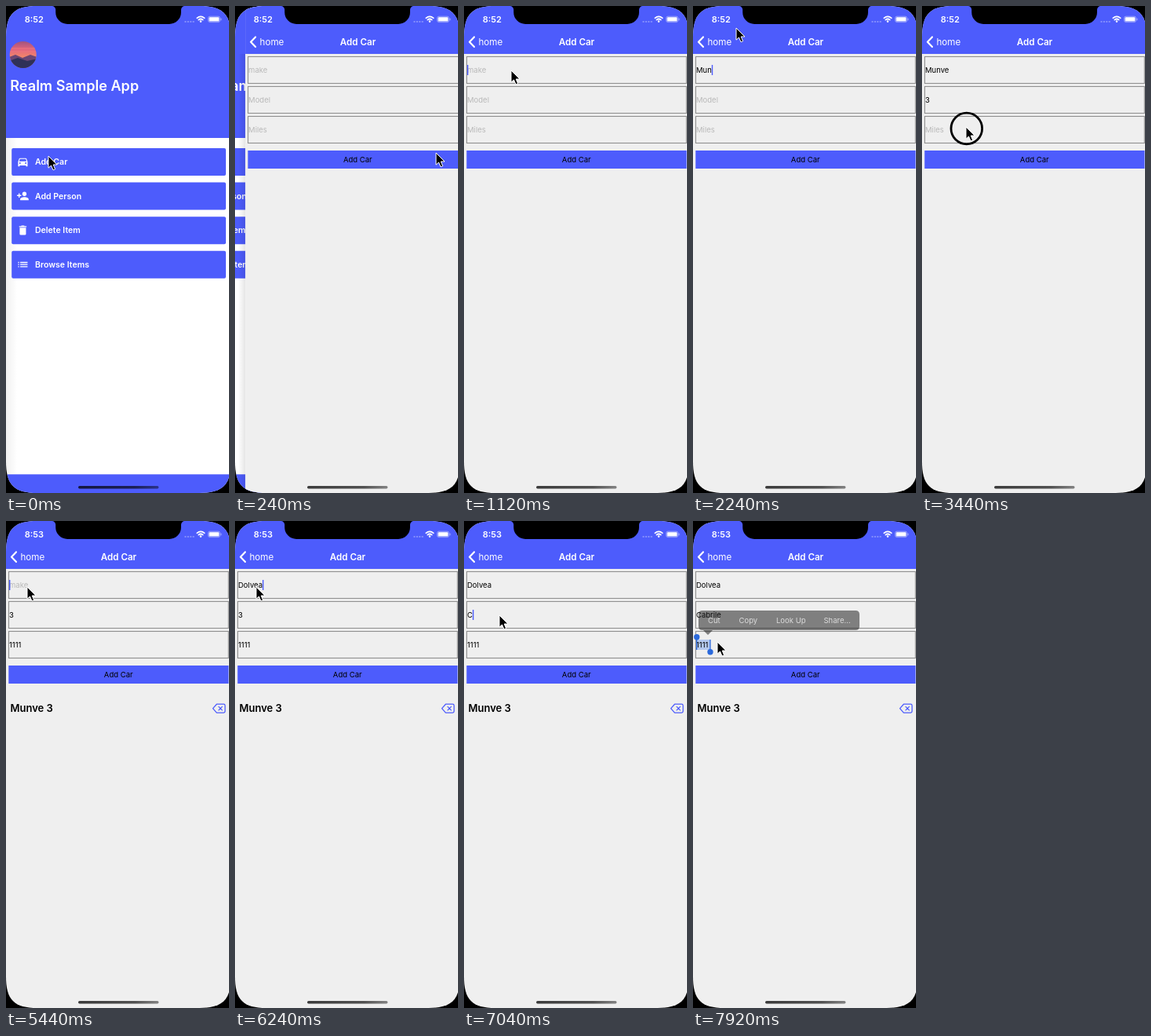
Recreate the animation shown at these times as an HTML page. Size 284 px wide and 620 px high, loop 8000 ms.

```html
<!DOCTYPE html>
<html lang="en">
<head>
<meta charset="utf-8">
<title>Sample app</title>
<style>
  html, body { margin: 0; width: 100%; height: 100%; overflow: hidden; background: #000; }
  svg { display: block; width: 284px; height: 620px; font-family: Inter, sans-serif; font-size: 9.5px; }
  .bold { font-weight: 600; }
  .white { fill: #fff; }
  .blue { fill: #4d5cfc; }
  .line { fill: none; stroke-linecap: round; stroke-linejoin: round; }
</style>
</head>
<body>
<svg viewBox="0 0 284 620">
  <defs>
    <clipPath id="screen">
      <path d="M0 40C0 10.400 10.400 0 40 0H246.500C276 0 286.500 10.400 286.500 40V580C286.500 609.600 276 620 246.500 620H40C10.400 620 0 609.600 0 580Z"/>
    </clipPath>
    <clipPath id="round"><circle cx="21.7" cy="62" r="17"/></clipPath>
    <linearGradient id="sky" x2="0" y2="1">
      <stop offset="0" stop-color="#a0547f"/>
      <stop offset=".3" stop-color="#e2667c"/>
      <stop offset=".6" stop-color="#f58a68"/>
    </linearGradient>
    <linearGradient id="edge">
      <stop offset="0" stop-opacity=".06"/>
      <stop offset="1" stop-opacity="0"/>
    </linearGradient>
    <linearGradient id="shade">
      <stop offset="0" stop-opacity="0"/>
      <stop offset="1" stop-opacity=".1"/>
    </linearGradient>
    <linearGradient id="bar">
      <stop offset="0" stop-opacity=".75"/>
      <stop offset=".7" stop-opacity=".66"/>
      <stop offset="1" stop-opacity=".45"/>
    </linearGradient>
  </defs>

  <g clip-path="url(#screen)">
    <g id="home">
      <rect width="284" height="620" fill="#fff"/>
      <rect y="168" width="14" height="428" fill="url(#edge)"/>
      <path class="blue" d="M0 0H284V168H0ZM0 596.300H284V620H0Z"/>
      <g clip-path="url(#round)">
        <rect x="4" y="45" width="36" height="35" fill="url(#sky)"/>
        <path d="M4 54H40M4 58H40" stroke="#ef7680" stroke-width="1.2"/>
        <path d="M4 65L12 62L21 66L31 62L40 65V80H4Z" fill="#6b4673"/>
        <path d="M4 70L15 66L27 70L40 67V80H4Z" fill="#2f3158"/>
      </g>
      <text class="bold white" x="5.3" y="108" font-size="18.1">Realm Sample App</text>
      <g id="menu"></g>
    </g>

    <g id="pane">
      <rect x="-9" y="61" width="9" height="559" fill="url(#shade)"/>
      <rect width="284" height="620" fill="#efefef"/>
      <rect class="blue" width="284" height="61"/>
      <path class="line" d="M13 39.5L7 45.7L13 52" stroke="#fff" stroke-width="2.2"/>
      <text class="white" x="18.5" y="49.8" font-size="11.6">home</text>
      <text class="bold white" x="143.5" y="49.8" font-size="11.6" text-anchor="middle">Add Car</text>
      <rect id="pick" x="4" y="151" width="18" height="13" fill="#b3c8ee"/>
      <g id="fields"></g>
      <rect id="caret" class="blue" y="75" width="1.4" height="13"/>
      <rect class="blue" x="3.3" y="184" width="280.2" height="23"/>
      <text x="143.2" y="198.8" text-anchor="middle">Add Car</text>
      <g id="item">
        <text class="bold" x="5.5" y="243.3" font-size="13">Munve 3</text>
        <path class="line" d="M268.3 233.2H277.2Q279 233.2 279 235V242.3Q279 244.1 277.2 244.1H268.3L263.500 238.6ZM270.9 236.4L275.3 240.9M275.3 236.4L270.9 240.9" stroke="#4d5cfc" stroke-width="1.3"/>
      </g>
      <g id="handles" fill="#2b69dc">
        <path d="M4 148H5.3V164H4ZM21.3 151H22.6V167H21.3Z"/>
        <circle cx="4.8" cy="147.8" r="3.7"/><circle cx="22" cy="166.8" r="3.7"/>
      </g>
      <g id="popup">
        <path d="M12 114H207Q212 114 212 119V134Q212 139 207 139H25L19 145L13 139H12Q7 139 7 134V119Q7 114 12 114Z" fill="#1e1e1e"/>
        <g fill="#ccc">
          <text x="19" y="130">Cut</text><text x="58.5" y="130">Copy</text>
          <text x="106" y="130">Look Up</text><text x="166.5" y="130">Share...</text>
        </g>
      </g>
    </g>

    <path d="M58.500 0A4.700 4.700 0 0 1 63.200 4.700V8A15 15 0 0 0 78.200 23H208A15 15 0 0 0 223 8V4.700A4.700 4.700 0 0 1 227.700 0Z"/>
    <text id="clock" class="bold white" x="23.7" y="21" font-size="11"></text>
    <path d="M227.5 20H240" stroke="#fff" stroke-opacity=".4" stroke-width="1.6" stroke-dasharray="2 1.4"/>
    <g class="line" stroke="#fff" stroke-width="1.7">
      <path d="M243.3 15.4Q248 11.4 252.7 15.4M245.3 17.6Q248 15.4 250.7 17.6"/>
      <circle cx="248" cy="19.6" r=".5"/>
    </g>
    <rect x="257.5" y="13.2" width="15" height="7.4" rx="2.2" fill="none" stroke="#fff" stroke-opacity=".5" stroke-width=".8"/>
    <rect class="white" x="258.6" y="14.2" width="12.8" height="5.4" rx="1.2"/>
    <path d="M274 15.6V18.4" stroke="#fff" stroke-opacity=".5"/>
    <rect x="92" y="611" width="102.5" height="3.4" rx="1.7" fill="url(#bar)"/>
  </g>

  <g id="cursor">
    <circle id="ring" cx=".8" cy="2" r="19.8" fill="none" stroke="#000" stroke-width="2.8"/>
    <path d="M0 0V15.2L3.5 12L6 17.8L8.6 16.7L6.2 11H11Z" stroke="#fff" stroke-linejoin="round"/>
  </g>
</svg>
<script>
const $ = id => document.getElementById(id);
const LOOP = 8000, STEP = 80, WIDTH = 284;

const icons = [
  ["Add Car", "M18.92 6C18.72 5.42 18.16 5 17.5 5h-11C5.84 5 5.29 5.42 5.08 6L3 12v8q0 1 1 1h1q1 0 1-1v-1h12v1q0 1 1 1h1q1 0 1-1v-8ZM6.5 16a1.5 1.5 0 010-3 1.5 1.5 0 010 3Zm11 0a1.5 1.5 0 010-3 1.5 1.5 0 010 3ZM5 11l1.5-4.5h11L19 11Z"],
  ["Add Person", "M15 12a4 4 0 100-8 4 4 0 000 8ZM6 10V7H4v3H1v2h3v3h2v-3h3v-2ZM15 14c-2.7 0-8 1.3-8 4v2h16v-2c0-2.7-5.3-4-8-4Z"],
  ["Delete Item", "M6 19q0 2 2 2h8q2 0 2-2V7H6ZM19 4h-3.5l-1-1h-5l-1 1H5v2h14Z"],
  ["Browse Items", "M3 7h2v2H3Zm0 4h2v2H3Zm0 4h2v2H3ZM7 7h14v2H7Zm0 4h14v2H7Zm0 4h14v2H7Z"]
];
$("menu").innerHTML = icons.map(([label, d], i) => `<g transform="translate(0 ${181 + i * 43.6})">
  <rect class="blue" x="7.2" width="272.8" height="35" rx="2"/>
  <path class="white" fill-rule="evenodd" transform="translate(13.4 9.3) scale(.67)" d="${d}"/>
  <text class="bold white" x="37" y="21" font-size="10.55">${label}</text></g>`).join("");

// Edits: [start, interval, text]; a null text deletes backwards
const fields = [
  { hint: "make", edits: [[1920, 160, "Munve"], [5040, 80, null], [5520, 120, "Dolvea"]] },
  { hint: "Model", edits: [[3040, 80, "3"], [6880, 80, null], [7040, 80, "Cabrile"]] },
  { hint: "Miles", edits: [[3680, 100, "1111"]] }
];
$("fields").innerHTML = fields.map((f, i) => `<g transform="translate(0 ${i * 38})">
  <rect x="3.5" y="64.5" width="279.8" height="34" fill="none" stroke="#8f8f8f" stroke-width="1.1"/>
  <text x="4" y="84.9"></text></g>`).join("");
const inputs = [...$("fields").querySelectorAll("text")];

// Focus: [from, to, field]
const focus = [[1040, 2800, 0], [2800, 3440, 1], [3520, 4240, 2], [4960, 6640, 0], [6640, 7680, 1]];
const taps = [960, 2720, 3440, 4240, 4880, 6560, 7680];
const path = [
  [0, 54, 191], [80, 54, 191], [240, 256, 187], [400, 250, 182], [880, 60, 82], [1200, 60, 82],
  [1680, 55, 28], [2400, 55, 28], [2720, 60, 119], [3040, 60, 119], [3360, 56, 154], [3920, 56, 154],
  [4160, 130, 192], [4320, 130, 192], [4560, 120, 250], [4880, 27, 84], [6240, 27, 84],
  [6560, 45, 120], [7440, 45, 120], [7680, 31, 154], [8000, 31, 154]
];

const show = (id, on) => $(id).style.display = on ? "" : "none";
const shift = (id, x, y = 0) => $(id).setAttribute("transform", `translate(${x} ${y})`);

function valueAt(edits, t) {
  let value = "";
  for (const [start, gap, text] of edits) {
    if (t < start) break;
    const n = Math.floor((t - start) / gap) + 1;
    value = text === null ? value.slice(0, Math.max(0, value.length - n)) : text.slice(0, n);
  }
  return value;
}

function cursorAt(t) {
  const i = path.findIndex(p => p[0] > t);
  const [t0, x0, y0] = path[i - 1], [t1, x1, y1] = path[i];
  const k = (t - t0) / (t1 - t0), e = k * k * (3 - 2 * k);
  return [x0 + (x1 - x0) * e, y0 + (y1 - y0) * e];
}

function draw(t) {
  const x = t < 40 ? WIDTH : t > 640 ? 0 : WIDTH * Math.exp(-(t - 40) / 65);
  shift("pane", x);
  shift("home", -.3 * (WIDTH - x));
  show("pane", x < WIDTH);
  show("home", x > 0);

  fields.forEach((f, i) => {
    f.value = valueAt(f.edits, t);
    inputs[i].textContent = f.value || f.hint;
    inputs[i].setAttribute("fill", f.value ? "#000" : "#b9b9b9");
  });
  const active = focus.find(([from, to]) => t >= from && t < to);
  show("caret", active);
  if (active) {
    const i = active[2];
    shift("caret", 4 + (fields[i].value ? inputs[i].getComputedTextLength() : 0), i * 38);
  }

  show("item", t >= 4400);
  show("pick", t >= 7760);
  show("handles", t >= 7760);
  $("popup").setAttribute("opacity", Math.min(1, Math.max(0, (t - 7840) / 150)));
  $("clock").textContent = t < 4800 ? "8:52" : "8:53";
  shift("cursor", ...cursorAt(t));
  show("ring", taps.some(tap => t >= tap && t < tap + 2 * STEP));
}

const begin = performance.now();
function tick() {
  const t = (performance.now() - begin) % LOOP;
  draw(Math.floor(t / STEP) * STEP);
  requestAnimationFrame(tick);
}
tick();
</script>
</body>
</html>
```
